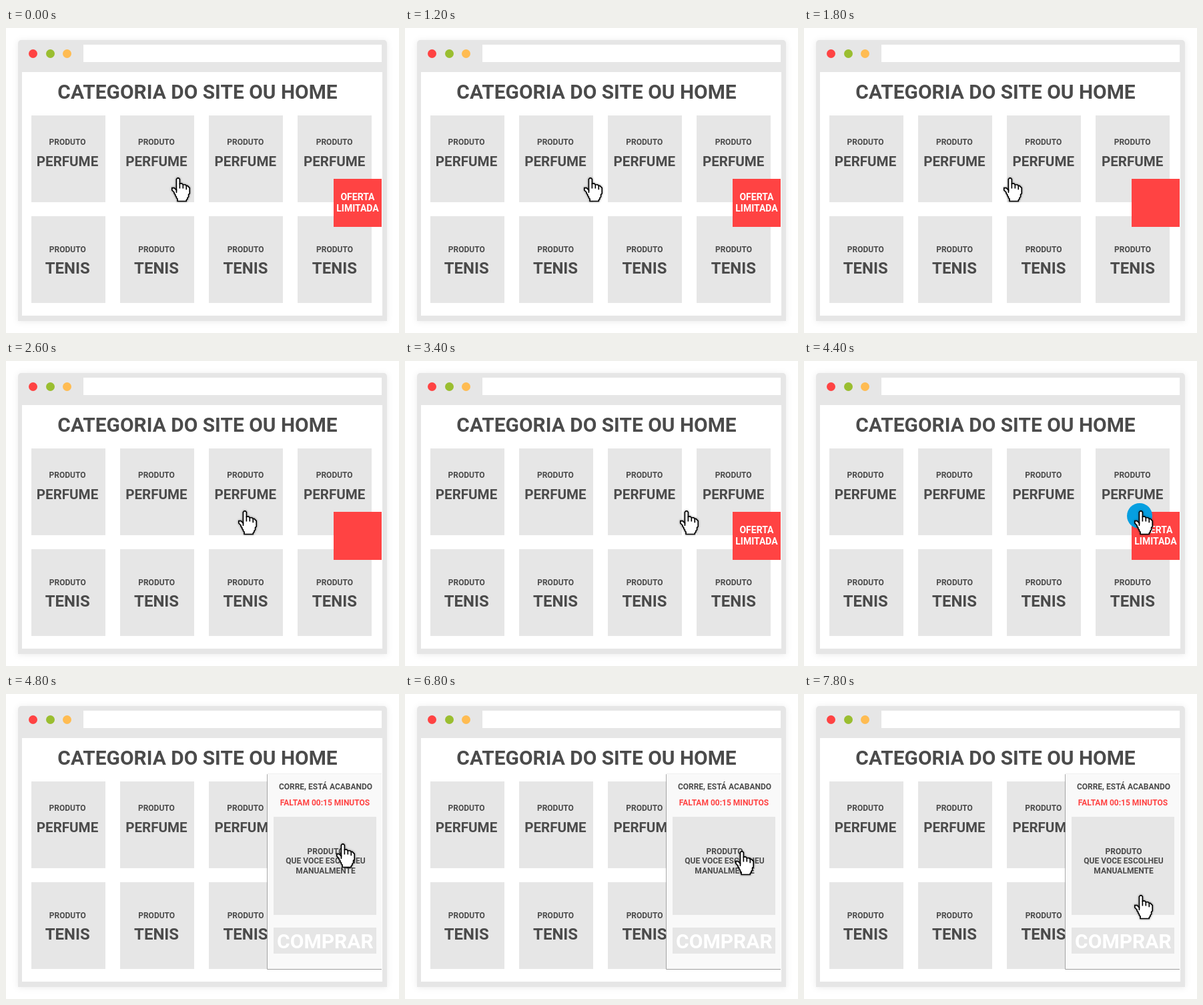
Write an HTML page that moves like this. It is 589x457 px and loops after 8000 ms.

```html
<!DOCTYPE html>
<html lang="pt">
<head>
<meta charset="utf-8">
<title>Oferta limitada</title>
<style>
  html, body { margin: 0; width: 100%; height: 100%; overflow: hidden; background: #fff; }
  svg { display: block; width: 589px; height: 457px; }
  text { font: 700 12px Roboto, sans-serif; text-anchor: middle; fill: #4b4b4b; }
  .gray { fill: #e6e6e6; }
  .white { fill: #fff; }
  .red { fill: #ff4343; }
  #window { filter: drop-shadow(0 1px 5px rgba(0, 0, 0, .08)); }
  #hand { filter: drop-shadow(0 .5px 1.6px rgba(0, 0, 0, .55)); }
  #hand path { stroke: #000; stroke-width: 1; stroke-linejoin: miter; }
</style>
</head>
<body>
<svg viewBox="0 0 589 457">
  <defs>
    <clipPath id="panelClip"><rect x="386" y="115" width="177" height="305"/></clipPath>
    <filter id="soft" x="-5%" y="-5%" width="110%" height="110%"><feGaussianBlur stdDeviation=".7"/></filter>
  </defs>

  <path id="window" class="gray" d="M18 439V23a5 5 0 0 1 5-5H566a5 5 0 0 1 5 5V439Z"/>
  <rect class="white" x="24" y="66" width="540" height="365"/>
  <rect class="white" x="116" y="25" width="447" height="26"/>
  <circle class="red" cx="40.5" cy="38.5" r="6.5"/>
  <circle fill="#9abe30" cx="66.5" cy="38.5" r="6.5"/>
  <circle fill="#ffbc52" cx="91.5" cy="38.5" r="6.5"/>
  <text x="287" y="106" style="font-size:29.9px">CATEGORIA DO SITE OU HOME</text>

  <g id="tiles"></g>

  <g id="badge">
    <rect class="red" x="491" y="226" width="72" height="72"/>
    <g id="offer"></g>
  </g>

  <g id="panel" clip-path="url(#panelClip)">
    <rect x="391.3" y="120.2" width="190" height="292.6" fill="#888" filter="url(#soft)"/>
    <rect x="392" y="119" width="171" height="293" fill="#f9f9f9"/>
    <rect x="392" y="119" width="171" height="1" fill="#efefef"/>
    <rect class="gray" x="401" y="184" width="154" height="147"/>
    <rect class="gray" x="401" y="350" width="154" height="39"/>
    <g id="deal"></g>
  </g>

  <circle id="click" cx="503" cy="232" r="19" fill="#069fe0"/>

  <g id="hand">
    <g transform="scale(1.65) translate(.5 .5)">
      <path fill="#fff" d="M5 0H6L7 1V5H9L10 6H12L13 7H14L16 9V14L15 15V17L14 18V19L13 20V21H5V19L4 18V17L3 16V15L2 14V13L0 11V9H2L4 11V1Z"/>
      <path fill="none" d="M7 5V9.5M10 6V9.5M13 7V10.5M4 10V13.5"/>
    </g>
  </g>
</svg>
<script>
  const $ = id => document.getElementById(id);

  function add(parent, tag, attrs, content = '') {
    const el = document.createElementNS('http://www.w3.org/2000/svg', tag);
    for (const key in attrs) el.setAttribute(key, attrs[key]);
    el.textContent = content;
    parent.append(el);
  }

  const label = (parent, x, y, size, content, cls = '') =>
    add(parent, 'text', { x, y, class: cls, style: `font-size:${size}px` }, content);

  const tiles = $('tiles');
  for (let col = 0; col < 4; col++) {
    const x = 38 + 133 * col;
    const mid = 92 + 133.4 * col;
    for (const y of [131, 282]) add(tiles, 'rect', { class: 'gray', x, y, width: 111, height: 130 });
    label(tiles, mid, 175, 12, 'PRODUTO');
    label(tiles, mid, 207, 20.6, 'PERFUME');
    label(tiles, mid + .3, 336, 12, 'PRODUTO');
    label(tiles, mid + .2, 368, 24, 'TENIS');
  }

  label($('offer'), 527, 258, 14, 'OFERTA', 'white');
  label($('offer'), 527, 275, 14, 'LIMITADA', 'white');

  const deal = $('deal');
  label(deal, 479, 143, 12, 'CORRE, ESTÁ ACABANDO');
  label(deal, 478, 167, 12, 'FALTAM 00:15 MINUTOS', 'red');
  label(deal, 479, 240, 12, 'PRODUTO');
  label(deal, 479, 254, 12, 'QUE VOCE ESCOLHEU');
  label(deal, 479, 269, 12, 'MANUALMENTE');
  label(deal, 478.3, 380.5, 30, 'COMPRAR', 'white');

  // Hand travel: [step, x offset], straight between the points
  const travel = [[0, 0], [8, 81.6], [9, 99.5], [12, 147], [18, 247]];

  function travelAt(step) {
    const i = Math.max(1, travel.findIndex(p => p[0] >= step));
    const [[s0, x0], [s1, x1]] = [travel[i - 1], travel[i]];
    return x0 + (x1 - x0) * (step - s0) / (s1 - s0);
  }

  const STEP = 200, LAST = 18;
  const stepsSince = (t, start) => Math.floor((t - start) / STEP) + 1;
  const show = (id, on) => $(id).setAttribute('visibility', on ? 'visible' : 'hidden');

  function draw(t) {
    const across = Math.min(LAST, Math.max(0, stepsSince(t, 1000)));
    const down = Math.max(0, stepsSince(t, 6800));
    const open = t >= 4800;
    const x = Math.round(248 + travelAt(across));
    const y = Math.round(224 + (down ? 11 + 13.2 * (down - 1) : 0));
    $('hand').setAttribute('transform', `translate(${x} ${y})`);
    show('badge', !open);
    show('offer', !open && across % 6 < 3);
    show('click', !open && across === LAST);
    show('panel', open);
  }

  const begin = performance.now();
  function tick() {
    draw((performance.now() - begin) % 8000);
    requestAnimationFrame(tick);
  }
  draw(0);
  requestAnimationFrame(tick);
</script>
</body>
</html>
```
